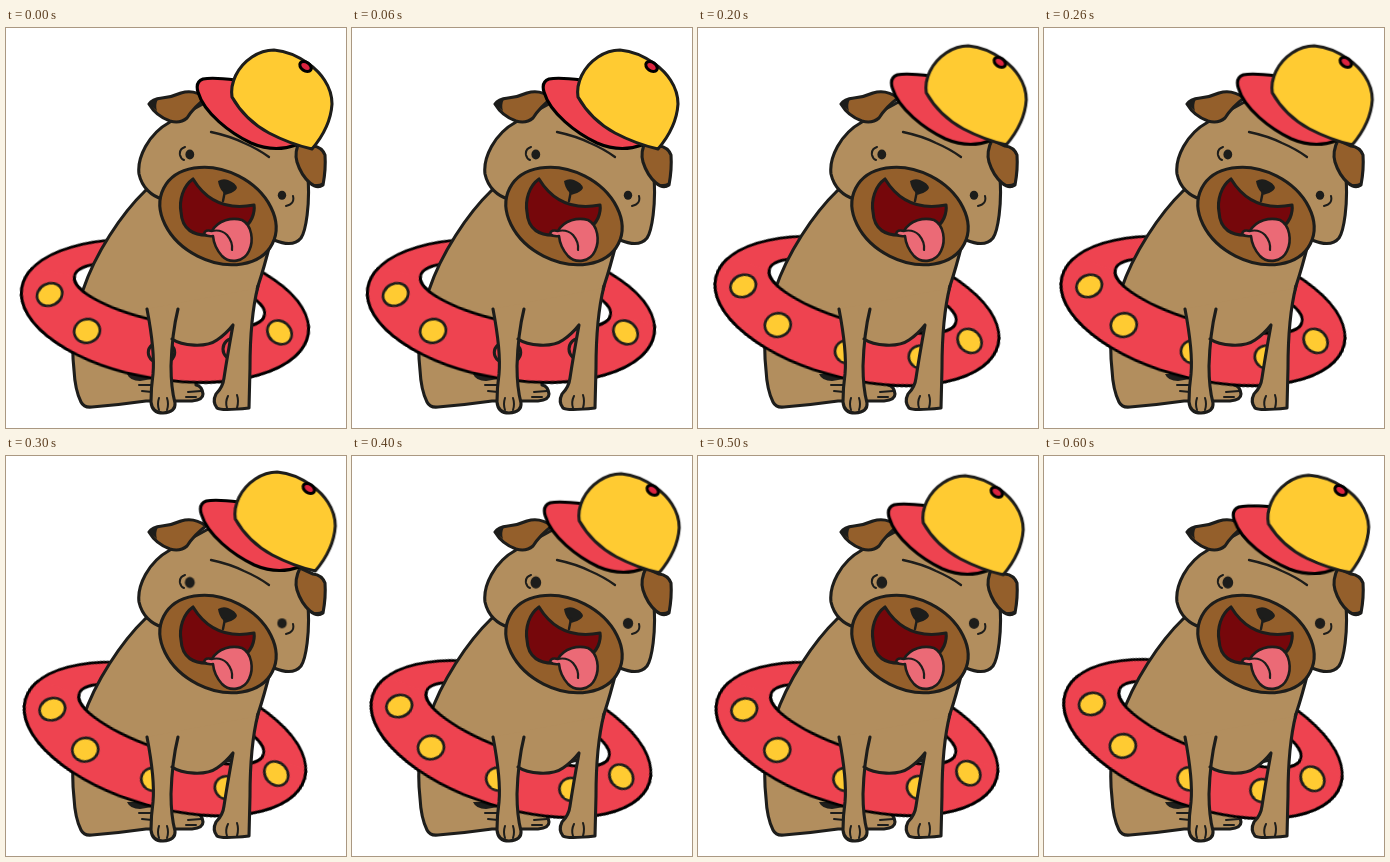
Animation, 340 px wide and 400 px high, one loop 0.7 s. Source, as an HTML page:

```html
<!DOCTYPE html>
<html lang="en">
<head>
<meta charset="utf-8">
<title>Pug with swim ring</title>
<style>
  html, body { margin: 0; width: 100%; height: 100%; overflow: hidden; background: #fff; }
  svg { display: block; width: 340px; height: 400px; }

  .line { fill: none; }
  .fur { fill: #b28e5e; }
  .dark { fill: #945f2b; }
  .red { fill: #ee4350; }
  .yellow { fill: #ffcb32; }
  .ink { fill: #1d1d1b; stroke: none; }
  .bare { stroke: none; }

  .spin, .hat, .dots, .rims, .pupil { animation: 700ms step-end infinite; }
  .spin { animation-name: spin; }
  .hat { animation-name: nod; transform-origin: 260px 70px; }
  .dots { animation-name: show; }
  .rims { animation-name: hide; }
  .pupil { animation-name: widen; transform-box: fill-box; transform-origin: center; }

  @keyframes spin {
    0% { transform: rotate(9.1deg); }
    14.2857% { transform: rotate(11.5deg); }
    28.5714% { transform: rotate(13.4deg); }
    42.8571% { transform: rotate(15.8deg); }
    57.1429% { transform: rotate(17.4deg); }
    71.4286% { transform: rotate(15.6deg); }
    85.7143%, 100% { transform: rotate(18.5deg); }
  }
  @keyframes nod {
    0% { transform: none; }
    14.2857% { transform: translate(1.2px, -2px); }
    28.5714% { transform: translate(2.3px, -4.2px); }
    42.8571% { transform: translate(3.3px, -6px); }
    57.1429% { transform: translate(1.2px, -4.3px); }
    71.4286% { transform: translate(-.8px, -2.3px); }
    85.7143%, 100% { transform: translate(-1.5px, -2.5px) rotate(-2.3deg); }
  }
  @keyframes show {
    0% { opacity: 0; }
    14.2857%, 100% { opacity: 1; }
  }
  @keyframes hide {
    0% { opacity: 1; }
    14.2857%, 100% { opacity: 0; }
  }
  @keyframes widen {
    0% { transform: none; }
    42.8571% { transform: scale(1.12); }
    57.1429%, 100% { transform: scale(1.22); }
  }
</style>
</head>
<body>
<svg viewBox="0 0 340 400" stroke="#1d1d1b" stroke-width="3.1" stroke-linecap="round" stroke-linejoin="round">
  <defs>
    <path id="tube" fill-rule="evenodd" stroke="#000" stroke-width="2.8"
      d="M-145 0a145 68.3 0 1 1 290 0a145 68.3 0 1 1 -290 0z
         M-94.9 -20a97 27 2.5 1 1 193.8 8.4a97 27 2.5 1 1 -193.8 -8.4z"/>
    <clipPath id="front"><path d="M-160 -23L160 -9V90H-160Z"/></clipPath>
  </defs>

  <!-- far side of the ring -->
  <g transform="translate(159 283)"><g class="spin"><use href="#tube" class="red"/></g></g>

  <!-- torso and haunch -->
  <path class="fur" d="M140 162C115 186 89 226 77 262C65 292 66 325 68 342Q69 362 75 374Q78 380 86 379
    Q112 377 140 373L186 373Q197 372 197 366Q196 358 190 357L190 312L244 300Q246 275 252 258Q258 240 264 216L230 170Z"/>
  <path class="line" stroke-width="2" d="M133 357H146M136 363L146 364M182 364L195 363M180 369L190 369"/>
  <path class="ink" d="M121 346Q124 353 134 353L146 351V346Z"/>

  <!-- near side of the ring -->
  <g transform="translate(159 283)"><g class="spin">
    <use href="#tube" class="red" clip-path="url(#front)"/>
    <g class="yellow" stroke-width="2.7">
      <ellipse rx="13" ry="11" transform="translate(-116.5 2) rotate(-36)"/>
      <ellipse rx="13" ry="11.8" transform="translate(-73.8 32) rotate(-28)"/>
      <ellipse rx="13" ry="11" transform="translate(116.5 3) rotate(32)"/>
      <g class="dots">
        <ellipse cx="0" cy="42" rx="12.3" ry="11.5"/>
        <ellipse cx="73" cy="30" rx="12.3" ry="11.5"/>
      </g>
    </g>
  </g></g>
  <g class="rims red">
    <ellipse cx="155.5" cy="324.5" rx="13.2" ry="11"/>
    <ellipse cx="228.5" cy="321" rx="11.5" ry="11"/>
  </g>

  <!-- chest and front legs -->
  <path class="fur bare" d="M141 281C145 302 149 325 147 346Q145 360 145 374Q146 385 157 385Q170 384 169 375
    Q165 360 165 338L166 311C176 318 200 320 211 312Q220 306 227 297Q221 330 218 350Q217 359 210 366
    Q206 374 211 380Q215 383 242 380L244 340Q245 290 252 260Z"/>
  <path class="line" d="M141 281C145 302 149 325 147 346Q145 360 145 374Q146 385 157 385Q170 384 169 375
    Q165 360 165 338Q166 305 172 281M166 311C176 318 200 320 211 312Q220 306 227 297Q221 330 218 350Q217 359 210 366
    Q206 374 211 380Q215 383 243 380L244 340Q244 290 252 258"/>
  <path class="line" stroke-width="2" d="M153 370Q151 376 153 382M161 370Q163 376 161 382M222 368Q219 374 221 380M231 367Q233 373 231 380"/>

  <!-- head -->
  <path class="fur" d="M156 171C146 168 136 160 133 146C131 130 142 106 164 94L215 66L292 106L302 150
    C304 176 300 203 295 210Q287 220 268 212L212 190Z"/>
  <path class="dark" d="M143 76Q146 71 156 70Q166 69 175 65Q188 61 200 70Q188 79 181 90Q174 96 164 93Q150 88 143 76Z"/>
  <path class="ink" d="M143 76Q147 71 152 71Q149 77 151 83Z"/>
  <path class="dark" d="M294 112Q288 124 291 134Q295 147 304 155Q311 161 317 157Q320 141 319 127Q316 119 307 118Z"/>
  <path class="ink" d="M306 156Q312 157 318 154L317 158Q311 162 306 156Z"/>
  <path class="line" stroke-width="2.3" d="M205 104Q224 108 238 115Q252 121 263 129"/>

  <ellipse class="dark" rx="61" ry="45" transform="translate(212 188) rotate(27)"/>
  <path fill="#76070b" d="M187 151C177 158 173 172 175 184C176 202 188 208 204 207Q238 208 246 190Q249 183 248 177
    C222 182 201 174 187 151Z"/>
  <path fill="#eb6a76" stroke-width="2.6" d="M198 206Q199 201 206 203C212 192 226 189 236 192C246 197 248 213 243 223
    C238 234 224 236 216 228Q208 219 207 208Q202 209 198 206Z"/>
  <path class="line" stroke-width="2.2" d="M206 203Q215 201 221 207Q227 214 226 222"/>
  <path class="ink" d="M212 153Q217 150 222 152Q230 155 231 160Q229 164 222 166Q218 168 217 164Q213 160 212 153Z"/>
  <path class="line" stroke-width="2.4" d="M219 163L217 173"/>

  <ellipse class="ink pupil" cx="183.8" cy="126.5" rx="4.4" ry="5"/>
  <ellipse class="ink pupil" cx="276" cy="167.3" rx="4.2" ry="4.5"/>
  <path class="line" stroke-width="2" d="M179 119Q173 121 174 127Q175 131 178 132M287 168Q289 176 280 178"/>

  <!-- cap -->
  <g class="hat">
    <path class="red" stroke="#000" d="M230 52Q206 49 197 51Q189 54 192 64C198 85 224 105 245 115Q268 125 290 117L240 62Z"/>
    <path class="yellow" d="M306 121C317 108 325 92 326 76C326 58 314 44 303 36C292 28 280 23 268 22
      C258 22 252 25 246 29C231 39 224 55 226 69Q239 92 263 105Q284 116 306 121Z"/>
    <ellipse fill="#dc2440" stroke="#000" rx="6.3" ry="4.3" transform="translate(299.5 38.5) rotate(35)"/>
  </g>
</svg>
</body>
</html>
```
